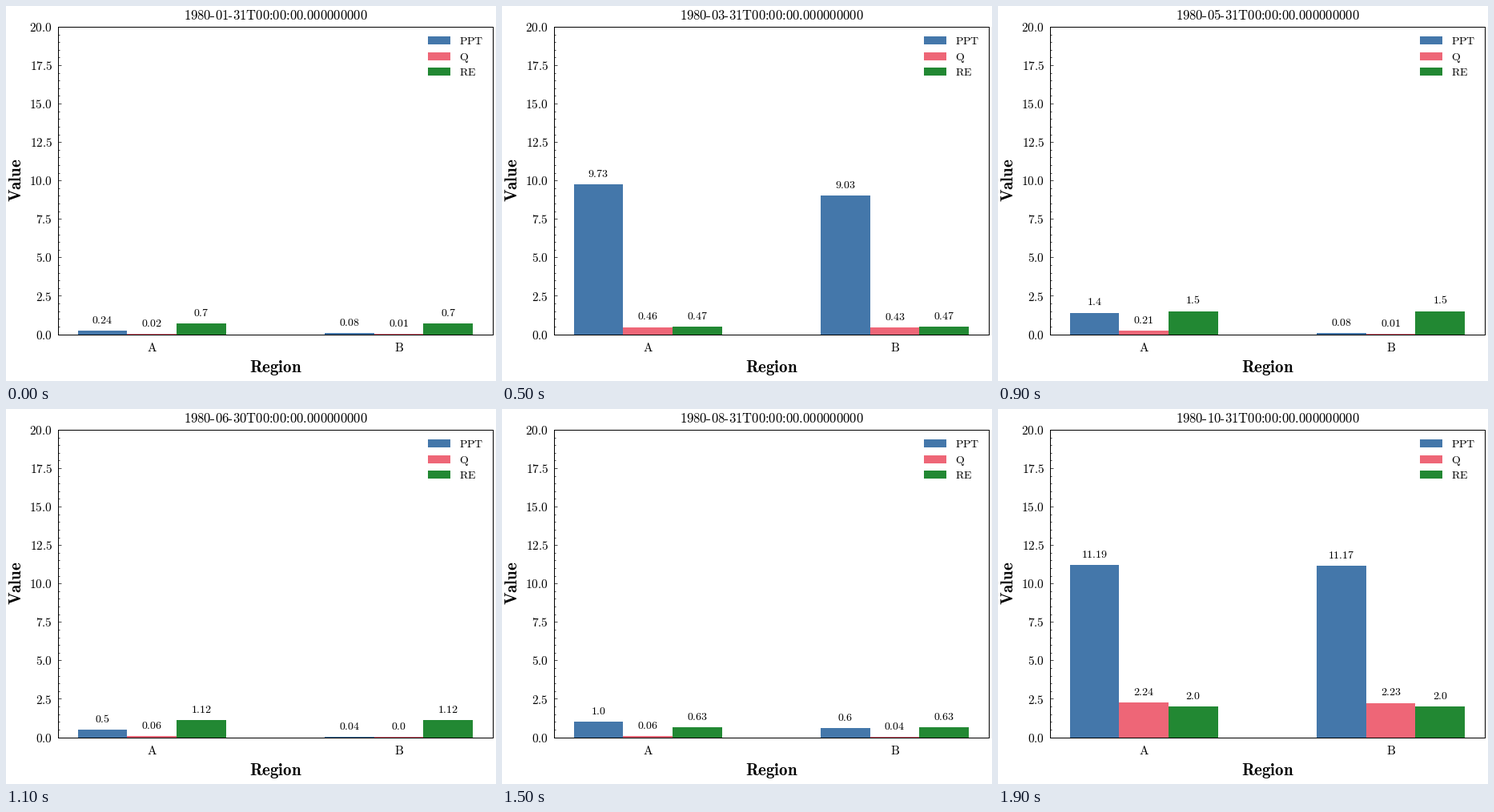
A matplotlib script that plays this animation: 612x469 px, repeating every 2000 ms.

```python
import matplotlib.pyplot as plt
import numpy as np
from matplotlib.animation import FuncAnimation
from matplotlib.patches import Rectangle

plt.rcParams["mathtext.fontset"] = "cm"

W, H, DPI = 612, 469, 100
LEFT, RIGHT, TOP, BOTTOM = 64.9, 607.8, 25.9, 410.53
X_MIN, X_MAX, Y_MAX = -0.38, 1.38, 20
BAR = 0.2
NAMES = ["PPT", "Q", "RE"]
COLORS = ["#4477AA", "#EE6677", "#228833"]
STEPS = [0.3, 1]

# Monthly rain per region; recharge peaks every half year and decays,
# and runoff is the share of rain set by the recharge.
rain = np.array([
    [0.26, 0.23, 9.73, 8.81, 1.40, 0.50, 0.23, 1.00, 4.64, 11.19],
    [0.08, 0.08, 9.03, 10.36, 0.08, 0.04, 0.02, 0.60, 4.27, 11.17],
]).T
n_months = len(rain)
since_peak = (np.arange(n_months) - 3) % 6
recharge = np.repeat(2 * 0.75 ** since_peak[:, None], 2, axis=1)
runoff = rain * recharge / 10
values = np.stack([rain, runoff, recharge], axis=-1).reshape(n_months, 6)
previous = np.pad(values, ((1, 0), (0, 0)), mode="reflect")[:-1]

months = np.datetime64("1980-02") + np.arange(n_months)
dates = [str(d) for d in (months.astype("datetime64[D]") - 1).astype("datetime64[ns]")]

fig = plt.figure(figsize=(W / DPI, H / DPI), dpi=DPI, facecolor="white")
ax = fig.add_axes([LEFT / W, 1 - BOTTOM / H, (RIGHT - LEFT) / W, (BOTTOM - TOP) / H])
ax.set_xlim(X_MIN, X_MAX)
ax.set_ylim(0, Y_MAX)
major = np.arange(0, 20.1, 2.5)
ax.set_xticks([])
ax.set_yticks(major)
ax.set_yticks(np.arange(0, 20.1, 0.5), minor=True)
ax.tick_params(axis="y", direction="in", labelleft=False, width=0.5, length=3)
ax.tick_params(axis="y", which="minor", direction="in", width=0.5, length=1.5)
for spine in ax.spines.values():
    spine.set_linewidth(0.72)

# Overlay in pixel coordinates, y pointing down
page = fig.add_axes([0, 0, 1, 1])
page.set_xlim(0, W)
page.set_ylim(H, 0)
page.axis("off")


def roman(s):
    return rf"$\text{{{s}}}$"


def write(x, y, s, size, ha="center", **kw):
    return page.text(x, y, s, fontsize=size, ha=ha, va="baseline", **kw)


def box(x, y, w, h, color):
    page.add_patch(Rectangle((x, y), w, h, facecolor=color, linewidth=0))


def px(x):
    return LEFT + (x - X_MIN) / (X_MAX - X_MIN) * (RIGHT - LEFT)


def py(y):
    return BOTTOM - y / Y_MAX * (BOTTOM - TOP)


for v in major:
    write(57.95, py(v) + 6.1, roman(f"{v:.1f}"), 11, ha="right")
for i, region in enumerate("AB"):
    write(px(i) + 0.2, 432, roman(region), 11)
write(336.5, 458, r"$\mathbf{Region}$", 15)
write(19, 218, r"$\mathbf{Value}$", 15, rotation=90, rotation_mode="anchor")

for name, color, y in zip(NAMES, COLORS, [38, 58, 77]):
    box(527, y, 28, 10, color)
    write(565.9, y + 10, roman(name), 10, ha="left")

# Title: three text parts joined by drawn hyphens
EM = 12 * DPI / 72
TITLE_X, TITLE_Y = 221.8, 17
title = [write(TITLE_X + dx * EM, TITLE_Y, "", 12, ha="left") for dx in (0, 2.333, 3.667)]
for dx in (2, 3.333):
    box(TITLE_X + (dx + 0.011) * EM, TITLE_Y - 4, 0.265 * EM, 1, "black")

centers = [i + (k - 1) * BAR for i in range(2) for k in range(3)]
bars = ax.bar(centers, np.zeros(6), BAR, color=COLORS * 2)
labels = [write(px(x), BOTTOM, "", 10) for x in centers]


def draw(frame):
    month, step = divmod(frame, len(STEPS))
    heights = previous[month] + STEPS[step] * (values[month] - previous[month])
    for part, s in zip(title, dates[month].split("-")):
        part.set_text(roman(s))
    for bar, label, v in zip(bars, labels, heights):
        bar.set_height(v)
        label.set_y(py(v) - 9.2)
        label.set_text(roman(str(round(float(v), 2))))
    return [*title, *bars, *labels]


anim = FuncAnimation(fig, draw, frames=n_months * len(STEPS), interval=100,
                     repeat=True, blit=False)
plt.show()
```
